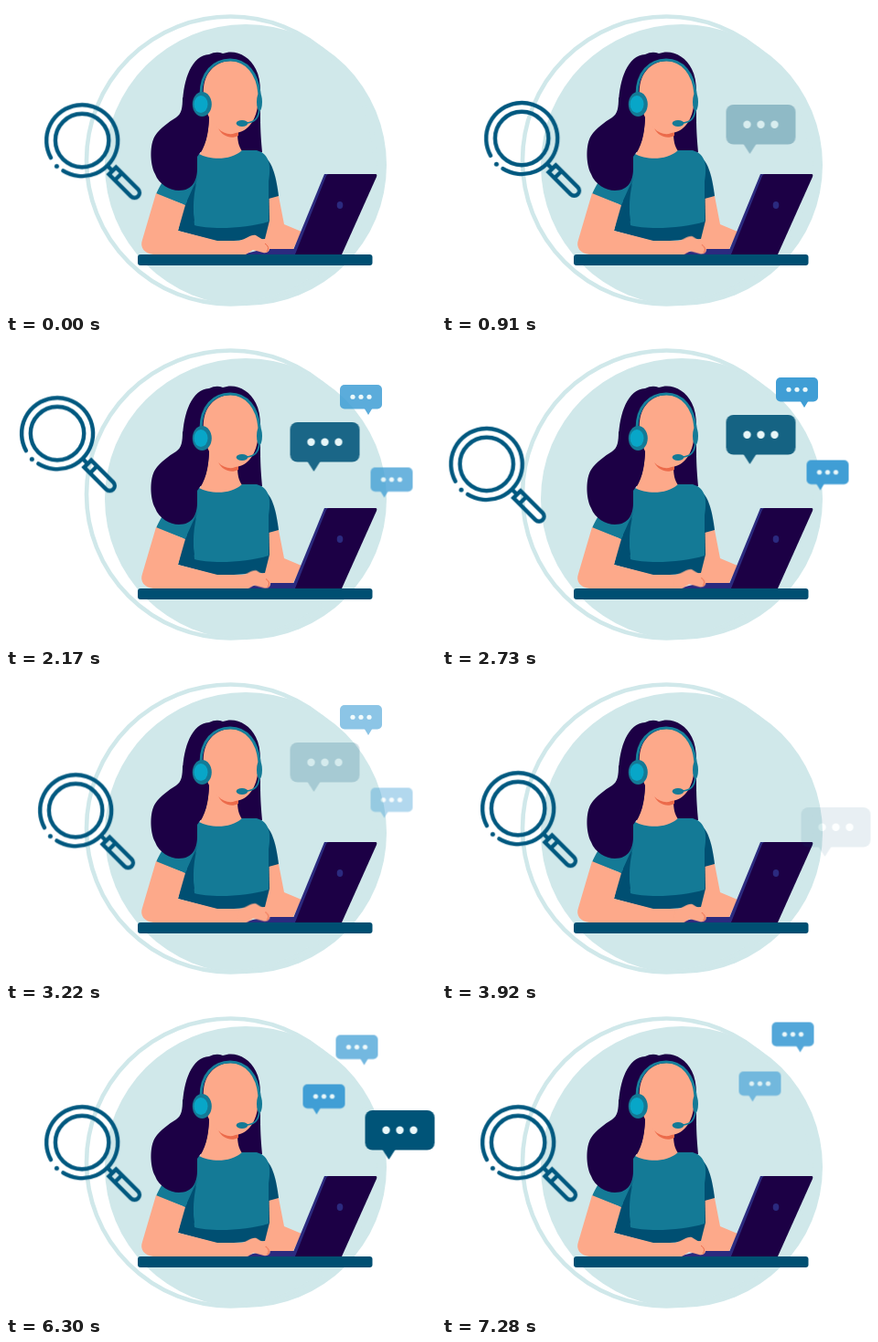
Animation of 470 by 335 pixels, one loop 7350 ms. Source, as an HTML page:

```html
<!DOCTYPE html>
<html lang="en">
<head>
<meta charset="utf-8">
<title>Support agent</title>
<style>
html, body { margin: 0; width: 100%; height: 100%; overflow: hidden; background: #fff; }
svg { display: block; width: 100%; height: 100%; }
.pale { fill: #d0e8ea; }
.skin { fill: #fda98a; }
.hair { fill: #1c0045; }
.shirt { fill: #147a96; }
.deep { fill: #004f72; }
.edge { fill: #2b2a7f; }
.blush { fill: #ec6b4b; }
.line { fill: none; stroke: #00587f; stroke-width: 4.4; stroke-linecap: round; }
.band { fill: none; stroke: #16809b; stroke-linecap: round; }
</style>
</head>
<body>
<svg id="stage" viewBox="0 0 470 335" xmlns="http://www.w3.org/2000/svg">
  <!-- backdrop -->
  <circle class="pale" cx="262" cy="174" r="154"/>
  <circle cx="245.500" cy="169" r="157.500" fill="none" stroke="#d0e8ea" stroke-width="4.600"/>

  <!-- back hair and neck -->
  <path class="hair" d="M237 52C250 47 266 54 273 69C280 82 278 103 278 122C278 138 279 148 280 160H210L193 107C194 80 203 54 222 53Q230 49 237 52Z"/>
  <path class="skin" d="M222 118C222 140 218 155 209 166C219 169 247 170 259 160C254 154 253 147 253 138Z"/>

  <!-- arms and shirt -->
  <path class="skin" d="M286 207L298 208L304 239L323 247L313 268H276L282 246Z"/>
  <path class="deep" d="M278 163C290 166 295 184 298 208L287 211Z"/>
  <path class="deep" d="M199 196L188 246L232 258L283 255L288 235L287 178L222 170Z"/>
  <path class="shirt" d="M211 162C222 168 245 170 258 158H274C285 161 291 170 287 192L287 236C263 244 222 245 206 240C204 219 205 208 208 194L196 218L164 206C172 188 183 173 211 162Z"/>
  <path class="deep" d="M211 184C204 199 203 215 206 236C201 231 198 222 198 213Z"/>
  <path class="skin" d="M164 205L196 218L188 246L231 257L262 257V272H161C151 271 146 264 149 256Z"/>

  <!-- front hair, face and headset -->
  <path class="hair" d="M193 100C193 111 192 118 186 122C178 127 168 134 163 142C157 151 157 173 163 184C167 195 179 202 189 202C204 202 209 191 209 178V165C217 155 221 143 222 122Z"/>
  <path class="blush" d="M232 134C238 141 249 142 254 137L254 142C246 146 237 143 232 134Z"/>
  <path class="skin" d="M216 98C214 75 228 60 246 60C264 60 276 77 276 98C276 122 266 139 249 139C231 139 218 125 216 98Z"/>
  <path class="band" stroke-width="3" d="M213 97C213 73 227 59 245 59C263 59 275 74 277 96"/>
  <ellipse class="shirt" cx="277" cy="105" rx="3" ry="10"/>
  <path class="band" stroke-width="1.800" d="M277 113C276 124 270 128 262 128"/>
  <ellipse class="shirt" cx="258" cy="128.500" rx="6.300" ry="3.400"/>
  <ellipse class="shirt" cx="214.300" cy="107.500" rx="10.500" ry="13.500"/>
  <ellipse cx="213" cy="107.500" rx="7.500" ry="9.500" fill="#08a6c8"/>

  <!-- laptop, hand and table -->
  <path class="edge" d="M258 272L282 266H318L316 272Z"/>
  <path class="edge" d="M348 184H355L320 272H312Z"/>
  <path class="hair" d="M353 184H404Q406 184 405 187L367 272H316L350 186Q351 184 353 184Z"/>
  <ellipse class="edge" cx="365" cy="218" rx="3.300" ry="4"/>
  <g id="hand">
    <path class="skin" d="M255 257C263 255 267 250 273 251C278 254 285 258 288 263C289 268 286 271 281 270L270 267L262 272H252Z"/>
    <path d="M283 260Q289 264 285 269" fill="none" stroke="#ec6b4b"/>
  </g>
  <rect class="deep" x="144" y="272" width="256.500" height="12" rx="3"/>

  <!-- magnifier, drawn around its lens centre -->
  <g transform="translate(72 123.300)">
    <g id="lens">
      <path class="line" transform="rotate(45)" d="M40 0H47M47-5.500H81a5.500 5.500 0 0 1 0 11H47ZM56-5.500V5.500"/>
      <circle class="line" r="29.200"/>
      <path class="line" d="M-34.100 18.900A39 39 0 1 1 -20.700 33.100"/>
      <circle cx="-27.700" cy="28.300" r="2.500" fill="#00587f"/>
    </g>
  </g>
</svg>
<script>
const LOOP = 7350, STEP = 70;
const stage = document.getElementById('stage');
const ramp = (t, from, to) => Math.min(1, Math.max(0, (t - from) / (to - from)));

// pose(t) gives the styles at t ms; the picture holds between steps
function play(el, pose) {
  const frames = Array.from({ length: LOOP / STEP + 1 },
    (_, i) => ({ ...pose(i * STEP), easing: 'step-end' }));
  el.animate(frames, { duration: LOOP, iterations: Infinity });
}

// the magnifier circles once without turning
play(document.getElementById('lens'), t => {
  const angle = Math.PI * (65 / 180 - 2 * ramp(t, 840, 3330));
  return { transform: `translate(${26.4 * Math.cos(angle)}px, ${26.4 * Math.sin(angle)}px)` };
});

// the hand taps five times per loop
play(document.getElementById('hand'), t => {
  const press = (1 - Math.cos(10 * Math.PI * t / LOOP)) / 2;
  return { transform: `translate(${press}px, ${1.5 * press}px)` };
});

// lift: share of the fade-in that passes before the bubble starts to rise
const big = { w: 76, h: 43.5, rx: 8, gap: 15, dot: 4.2, tail: 10.5, fill: '#005478', lift: 0 };
const small = { w: 46, h: 26.5, rx: 5, gap: 9, dot: 2.6, tail: 6.5, fill: '#409ed5', lift: .5 };

function bubble(kind, tip, x, y, appear, full, leave) {
  const { w, h, rx, gap, dot, tail, fill, lift } = kind;
  const g = document.createElementNS(stage.namespaceURI, 'g');
  const dots = [-1, 0, 1].map(i =>
    `<circle cx="${w / 2 + i * gap}" cy="${h / 2}" r="${dot}" fill="#eaf8fa"/>`);
  g.innerHTML = `<rect width="${w}" height="${h}" rx="${rx}" fill="${fill}"/>
    <path d="M${tip - tail * .7} ${h - 1}h${tail * 1.4}L${tip} ${h + tail}Z" fill="${fill}"/>${dots.join('')}`;
  stage.append(g);
  const start = appear + lift * (full - appear);
  play(g, t => ({
    transform: `translate(${x}px, ${y - Math.max(0, t - start) / STEP}px)`,
    opacity: ramp(t, appear, full) * (1 - ramp(t, leave, leave + 700))
  }));
}

bubble(big, 26, 310.5, 118, 210, 2450, 2660);
bubble(small, 31, 365, 54, 1330, 2310, 2940);
bubble(small, 15, 398.5, 143, 1470, 2380, 2800);
bubble(big, 26, 392.5, 149, 3710, 5950, 6440);
bubble(small, 15, 324.5, 94, 5110, 6020, 7035);
bubble(small, 31, 360.5, 34, 5320, 6650, 7210);
</script>
</body>
</html>
```
